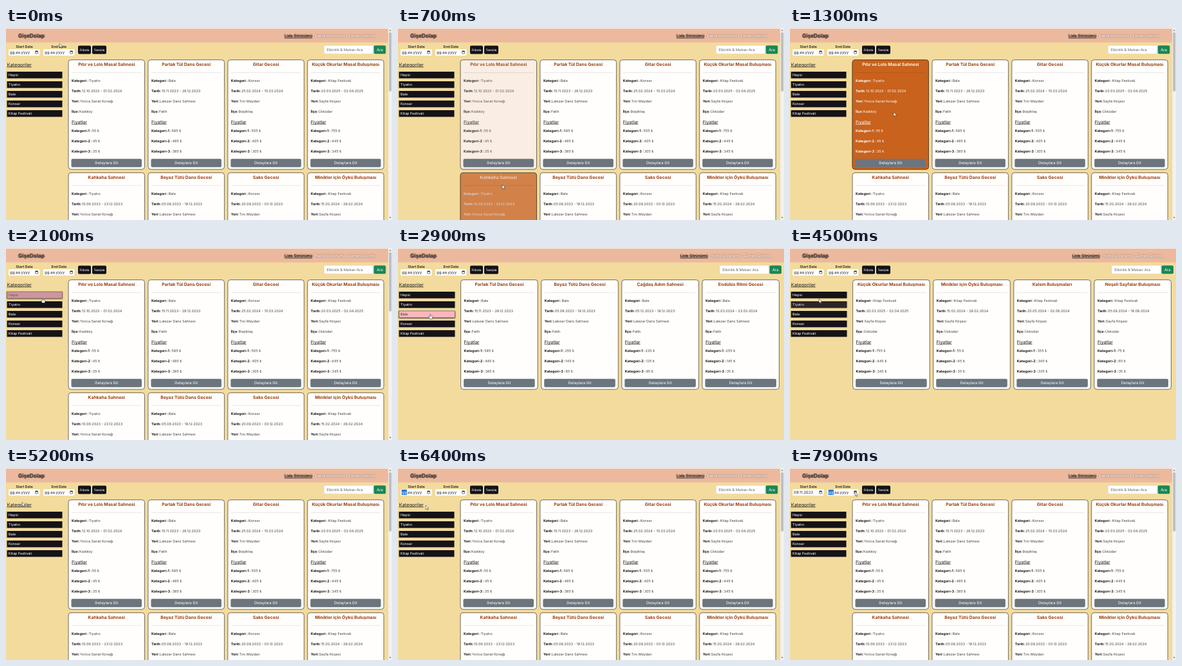
Write an HTML page that moves like this. It is 600x299 px and loops after 8000 ms.

```html
<!DOCTYPE html>
<html lang="tr">
<head>
<meta charset="utf-8">
<style>
  html, body { margin: 0; width: 100%; height: 100%; overflow: hidden; background: #f2db9d; }
  svg { position: fixed; left: 0; top: 0; font-family: Inter, "Noto Sans", sans-serif; text-rendering: geometricPrecision; }
  .shade { filter: drop-shadow(.8px .9px .8px #000a); }
  .lift { filter: drop-shadow(.8px 1.2px 1px #0008); }
</style>
</head>
<body>
<svg width="600" height="299" viewBox="0 0 600 299">
  <g id="scene"></g>
  <g id="cursor">
    <path id="arrow" d="M0 0V6.6L1.6 5.2L2.7 7.6L3.7 7.1L2.7 4.8H4.8Z" fill="#fff" stroke="#222" stroke-width=".5"/>
    <path id="hand" d="M-.7 .5Q0-.4 .7 .5V2.7L3.4 3.3Q4 3.6 3.8 5L3.2 7.6H-.6L-2.6 4.6Q-2.3 3.6-.7 4.8Z" fill="#fff" stroke="#222" stroke-width=".5"/>
  </g>
</svg>
<script>
const LOOP = 8000, STEP = 100, FADE = 200;
const $ = id => document.getElementById(id);

const categories = [
  { name: 'Tiyatro', venue: 'Yonca Sanat Konağı', district: 'Kadıköy', events: [
    ['Pıtır ve Lolo Masal Sahnesi', '12.10.2023 - 01.02.2024', 55, 45, 35],
    ['Kahkaha Sahnesi', '10.06.2023 - 23.12.2023', 155, 105, 55],
    ['Gölge Oyunu Gecesi', '05.11.2023 - 18.12.2023', 135, 95, 45],
    ['Kukla Sahnesi', '10.01.2024 - 23.02.2024', 95, 65, 35],
    ['Doğaçlama Gecesi', '15.03.2024 - 28.03.2024', 125, 85, 55]] },
  { name: 'Bale', venue: 'Lalezar Dans Sahnesi', district: 'Fatih', events: [
    ['Parlak Tül Dans Gecesi', '15.11.2023 - 28.12.2023', 585, 485, 385],
    ['Beyaz Tütü Dans Gecesi', '05.08.2023 - 18.12.2023', 255, 145, 85],
    ['Çağdaş Adım Sahnesi', '05.12.2023 - 18.12.2023', 235, 125, 85],
    ['Endülüs Ritmi Gecesi', '10.03.2024 - 23.03.2024', 255, 145, 35]] },
  { name: 'Konser', venue: 'Tını Meydan', district: 'Beşiktaş', events: [
    ['Gitar Gecesi', '25.02.2024 - 10.03.2024', 505, 405, 305],
    ['Saks Gecesi', '20.09.2023 - 03.12.2023', 355, 255, 155],
    ['Keman Gecesi', '05.01.2024 - 18.01.2024', 305, 205, 105],
    ['Türkü Akşamı', '10.04.2024 - 23.04.2024', 255, 155, 95],
    ['Piyano Akşamı', '15.05.2024 - 28.05.2024', 405, 305, 205]] },
  { name: 'Kitap Festivali', venue: 'Sayfa Köşesi', district: 'Üsküdar', events: [
    ['Küçük Okurlar Masal Buluşması', '20.03.2025 - 02.04.2025', 755, 445, 345],
    ['Minikler için Öykü Buluşması', '15.02.2024 - 28.02.2024', 55, 45, 35],
    ['Kalem Buluşmaları', '20.05.2024 - 02.06.2024', 355, 345, 335],
    ['Neşeli Sayfalar Buluşması', '05.08.2024 - 18.08.2024', 75, 65, 35]] }
];
const menu = ['Hepsi', ...categories.map(c => c.name)];
const pick = (c, i) => ({ ...c, event: c.events[i] });
const views = [
  [0, 1].flatMap(i => categories.map(c => pick(c, i))),
  ...categories.map(c => c.events.map((_, i) => pick(c, i)))
];

// Timelines: [time, value...]
const clicks = [[0, 0], [2400, 1], [2800, 2], [3300, 3], [3900, 4], [4700, 0]];
const startDate = [
  [0, 'gg.aa.yyyy', -1], [5600, 'gg.aa.yyyy', 0], [6600, '09.aa.yyyy', 1],
  [6900, '09.01.yyyy', 1], [7000, '09.11.yyyy', 2], [7100, '09.11.0002', 2],
  [7200, '09.11.0020', 2], [7300, '09.11.0202', 2], [7400, '09.11.2023', 2],
  [7700, '09.11.2023', -1]
];
const endDate = [[0, 'gg.aa.yyyy', -1], [7700, 'gg.aa.yyyy', 0]];
const path = [
  [0, 83, 24], [300, 150, 110], [600, 160, 250], [850, 165, 235], [1250, 161, 131],
  [1450, 161, 131], [1900, 62, 64], [2050, 57, 76], [2100, 57, 78], [2300, 55, 88],
  [2500, 55, 88], [2700, 50, 103], [3050, 50, 103], [3250, 48, 118], [3600, 48, 118],
  [3800, 48, 133], [4100, 48, 133], [4320, 45, 83], [4500, 45, 79], [4650, 44, 73],
  [4950, 44, 73], [5400, 10, 37], [5900, 10, 37], [6300, 43, 58], [6900, 43, 58],
  [7500, 101, 37], [8000, 101, 37]
];

const at = (line, t) => line.findLast(k => k[0] <= t);

function pointer(t) {
  t = Math.max(0, t);
  const i = Math.max(1, path.findIndex(p => p[0] >= t));
  const [a, b] = [path[i - 1], path[i]];
  const k = (t - a[0]) / (b[0] - a[0]);
  return [a[1] + (b[1] - a[1]) * k, a[2] + (b[2] - a[2]) * k];
}

const inside = ([px, py], x, y, w, h) => px >= x && px <= x + w && py >= y && py <= y + h;

// Hover strength: share of the recent fade window spent inside the box.
function hover(t, box) {
  let n = 0;
  for (let i = 0; i < 10; i++) n += inside(pointer(t - i * FADE / 10), ...box);
  return n / 10;
}

const rect = (x, y, w, h, fill, r = 0, extra = '') =>
  `<rect x="${x}" y="${y}" width="${w}" height="${h}" rx="${r}" fill="${fill}" ${extra}/>`;
const text = (x, y, size, weight, fill, str, extra = '') =>
  `<text x="${x}" y="${y}" font-size="${size}" font-weight="${weight}" fill="${fill}" ${extra}>${str}</text>`;
const mid = 'text-anchor="middle"', under = 'text-decoration="underline"';
const fade = (k, body) => k ? `<g opacity="${k}">${body}</g>` : '';

function card({ name, venue, district, event }, x, y, w, hot) {
  const [title, dates, ...prices] = event;
  const ink = hot ? '#fff' : '#161616';
  const row = (dy, label, value) => text(x + 5, y + dy, 5.5, 700, ink,
    `${label} <tspan dx="-.7" font-weight="400" fill="${hot ? '#fff' : '#444'}">${value}</tspan>`);
  return rect(x, y, w, 170.5, hot ? '#c8621d' : '#fffefc', 4, 'stroke="#3a3630" stroke-width=".7"')
    + text(x + w / 2, y + 9.6, 6.8, 700, hot ? '#fff3e6' : '#9c3c0c', title, mid)
    + rect(x + 5, y + 19.5, w - 10, .5, hot ? '#a9500f' : '#cfcfcf')
    + row(34.3, 'Kategori :', name) + row(50.4, 'Tarih:', dates)
    + row(66.4, 'Yeri:', venue) + row(82.4, 'İlçe:', district)
    + text(x + 5, y + 99, 6.9, 400, ink, 'Fiyatlar', under)
    + prices.map((p, i) => row(112.2 + i * 16, `Kategori-${i + 1} :`, p + ' ₺')).join('')
    + rect(x + 4.5, y + 154.2, w - 9, 13, '#6c757d', 2)
    + text(x + w / 2, y + 162.8, 5.9, 400, '#fff', 'Detaylara Git', mid);
}

function dateField(x, label, [, value, active]) {
  const spots = [[0, 8.2], [9.2, 8.2], [18.5, 15]];
  const parts = value.split('.').map((s, i) => `<tspan fill="${i === active ? '#fff' : '#222'}">${s}</tspan>`);
  const mark = spots[active];
  return text(x + 24.5, 31.2, 5.5, 600, '#222', label, mid)
    + rect(x, 33, 48.5, 10, '#fff', 1.5)
    + (mark ? rect(x + 1.6 + mark[0], 33.7, mark[1], 8.3, '#1a73d8') : '')
    + text(x + 2, 40.2, 6, 400, '#222', parts.join('.'))
    + rect(x + 41.7, 35.8, 3.8, 4.2, 'none', .4, 'stroke="#222" stroke-width=".6"')
    + rect(x + 41.7, 35.8, 3.8, 1.3, '#222');
}

const menuBox = (i, w = 86) => [1.5, 68 + i * 15, w, 10.4];

function menuItem(label, i, w, t) {
  const box = menuBox(i, w), y = box[1] + 7.3;
  return rect(...box, '#151318')
    + text(4, y, 5.5, 400, '#fff', label)
    + fade(hover(t, box),
      rect(...box, '#fbb6bf', 0, 'class="lift" stroke="#5a4a40" stroke-width=".6"')
      + text(4, y, 5.5, 400, '#333', label));
}

const blackButton = (x, w, label) =>
  rect(x, 27.5, w, 13, '#131218', 2) + text(x + w / 2, 35.8, 4.6, 500, '#fff', label, mid);

function scene(t) {
  const view = at(clicks, t)[1], cards = views[view];
  const scroll = cards.length > 4;
  const width = scroll ? 594.3 : 600, shift = width - 594.3;
  const x0 = scroll ? 97 : 97.6, pitch = scroll ? 123.9 : 125.1, w = scroll ? 118.5 : 119.6;
  const link = (x, fill, label, extra) => text(x + shift, 14, 5.7, 500, fill, label, extra);

  let out = rect(0, 0, 600, 299, '#f2db9d') + rect(0, 0, width, 1, '#f7f2ee')
    + rect(0, 1, width, 21.5, '#ecb99e')
    + '<g class="shade">'
    + text(19, 15, 8.3, 600, '#3a3030', 'GişeDolap')
    + link(433, '#111', 'Liste Görünümü', under)
    + link(480.5, '#fff', 'Harita Görünümü')
    + link(532, '#fff', 'Zamanı Geçmiş') + '</g>'
    + dateField(4, 'Start Date', at(startDate, t))
    + dateField(58, 'End Date', at(endDate, t))
    + blackButton(112, 20, 'Filtrele') + blackButton(134, 22, 'Temizle')
    + rect(494.3 + shift, 27.2, 76.5, 13, '#fff', 2, 'stroke="#d8d0c0" stroke-width=".4"')
    + text(498.5 + shift, 35.7, 5.8, 400, '#666', 'Etkinlik &amp; Mekan Ara')
    + rect(571.8 + shift, 27.2, 18.5, 13, '#198754', 2)
    + text(581 + shift, 35.8, 5.9, 400, '#fff', 'Ara', mid)
    + text(1.5, 59.5, 7.4, 400, '#222', 'Kategoriler', under)
    + menu.map((m, i) => menuItem(m, i, scroll ? 86 : 87, t)).join('');

  cards.forEach((c, i) => {
    const x = x0 + i % 4 * pitch, y = 49.6 + Math.floor(i / 4) * 175.8;
    out += card(c, x, y, w, false)
      + fade(hover(t, [x, y, w, 170.5]), card(c, x, y, w, true));
  });

  if (scroll) out += rect(594.3, 0, 5.7, 299, '#f1f1f1')
    + '<path d="M597.2 2.5l1.5 2h-3zM597.2 296.5l1.5-2h-3z" fill="#666"/>'
    + rect(595.3, 7, 3.9, view ? 205 : 91.5, '#bdbdbd');
  return out;
}

let shown = -1;
function draw() {
  const t = Math.floor((performance.now() - begin) % LOOP / STEP) * STEP;
  if (t !== shown) {
    shown = t;
    $('scene').innerHTML = scene(t);
    const p = pointer(t);
    const onMenu = menu.some((_, i) => inside(p, ...menuBox(i)));
    $('cursor').setAttribute('transform', `translate(${p})`);
    $('hand').style.display = onMenu ? '' : 'none';
    $('arrow').style.display = onMenu ? 'none' : '';
  }
  requestAnimationFrame(draw);
}
const begin = performance.now();
draw();
</script>
</body>
</html>
```
